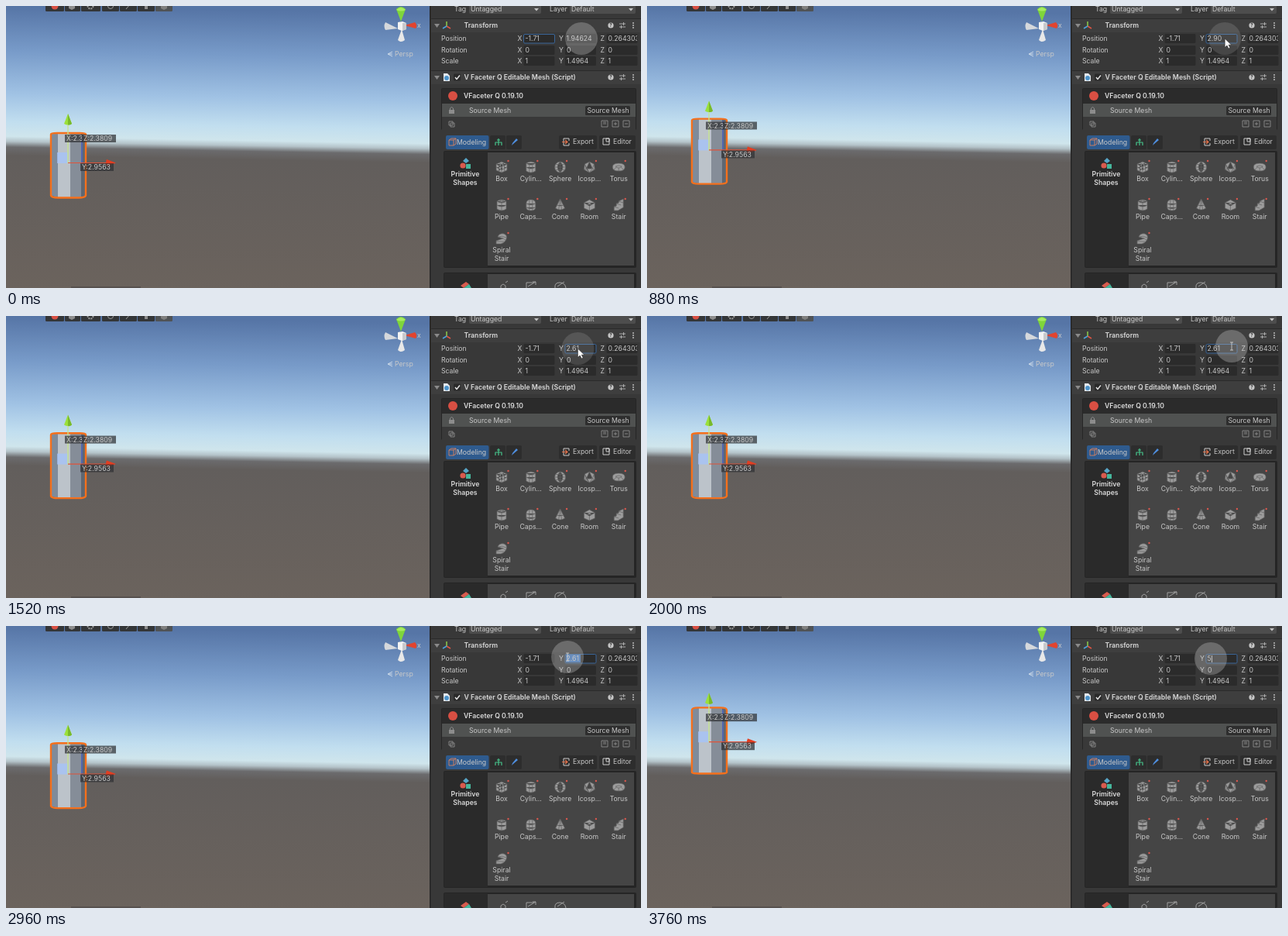
Animation of 820 by 364 pixels, one loop 3840 ms. Source, as an HTML page:

```html
<!DOCTYPE html>
<html lang="en">
<head>
<meta charset="utf-8">
<title>Mesh position editing</title>
<style>
html, body { margin: 0; width: 100%; height: 100%; overflow: hidden; background: #383838; }
svg { display: block; width: 820px; height: 364px; }
text { font: 8.7px Inter, sans-serif; fill: #c8c8c8; white-space: pre; }
.b { font-weight: 600; fill: #dadada; }
.m { text-anchor: middle; }
</style>
</head>
<body>
<svg id="stage" viewBox="0 0 820 364">
  <defs>
    <linearGradient id="sky" gradientUnits="userSpaceOnUse" x1="0" y1="0" x2="0" y2="364">
      <stop offset="0" stop-color="#5675a6"/>
      <stop offset=".16" stop-color="#789bc9"/>
      <stop offset=".31" stop-color="#a0c2e4"/>
      <stop offset=".41" stop-color="#c1deef"/>
      <stop offset=".462" stop-color="#cfe5ec"/>
      <stop offset=".48" stop-color="#b4c3c9"/>
      <stop offset=".5" stop-color="#6b6b6d"/>
      <stop offset=".53" stop-color="#625e5c"/>
      <stop offset="1" stop-color="#6b635d"/>
    </linearGradient>
    <clipPath id="zClip"><rect x="775" y="36" width="40" height="13"/></clipPath>
    <clipPath id="view"><rect width="547" height="364"/></clipPath>
  </defs>
</svg>
<script>
const stage = document.getElementById('stage');
const LOOP = 3840, STEP = 80;

function add(tag, attrs, parent = stage) {
  const el = document.createElementNS('http://www.w3.org/2000/svg', tag);
  for (const k in attrs) el.setAttribute(k, attrs[k]);
  parent.appendChild(el);
  return el;
}
const rect = (x, y, width, height, fill, parent, rx = 0) =>
  add('rect', { x, y, width, height, fill, rx }, parent);
const path = (d, fill, parent, stroke = 'none', w = 1) =>
  add('path', { d, fill, stroke, 'stroke-width': w, 'stroke-linejoin': 'round' }, parent);
const circle = (cx, cy, r, fill, parent) => add('circle', { cx, cy, r, fill }, parent);
const group = (x, y, parent) => add('g', { transform: `translate(${x} ${y})` }, parent);
// y is the middle of the line
function label(str, x, y, cls = '', parent) {
  const el = add('text', { x, y: y + 3.2, class: cls }, parent);
  el.textContent = str;
  return el;
}

// Scene backdrop
const scene = add('g', { 'clip-path': 'url(#view)' });
add('rect', { x: 0, y: -20, width: 548, height: 400, fill: 'url(#sky)', transform: 'skewY(1)' }, scene);
rect(84, 362, 90, 2, '#57514e', scene);

// Scene toolbar
for (const [x, w, fill] of [[51, 24, '#343638'], [76, 20, '#343638'], [97, 25, '#343638'],
  [124, 22, '#343638'], [147, 22, '#343638'], [170, 22, '#343638'], [193, 22, '#505356']])
  rect(x, -4, w, 11, fill, scene, 1.5);
circle(63, 0, 4.5, '#d84f43', scene);
path('M81 0v3l4 2 4-2v-3z', '#8d8d8d', scene);
add('circle', { cx: 109, cy: 0, r: 3.5, fill: 'none', stroke: '#999', 'stroke-width': 2, 'stroke-dasharray': '2 1' }, scene);
add('circle', { cx: 135, cy: 0, r: 3.5, fill: 'none', stroke: '#999' }, scene);
path('M155 4l5-6', 'none', scene, '#999');
path('M179 0h4v4h-4z', '#8d8d8d', scene);
path('M200 0v3l4 2 4-2v-3z', '#808080', scene);

// Orientation gizmo
const axes = group(511, 26, scene);
path('M-5 3L-21 -5Q-24 0 -21 5z', '#d5d8dc', axes);
path('M0 4l-5 14q4 4 9 0z', '#e8e8e8', axes);
path('M4 -1l13 -4q4 4 1 8z', '#e1442f', axes);
path('M-1 -6l-6 -16q6 -6 12 0z', '#7fd53a', axes);
path('M-7 -21q6 -6 12 0q-6 3 -12 0z', '#a5ea60', axes);
path('M-5 -5L1 -6L6 -4V4L0 6L-5 4z', '#f3f3f3', axes);
path('M1 -4L6 -4V4L1 6z', '#c8cacd', axes);
label('x', 20, -1, '', axes);
path('M499 59l-6 3 6 3M499 62h-5', 'none', scene, '#dfe7ef', .8);
label('Persp', 502, 62, '', scene);

// Cylinder and move handle, centred on the handle origin
const body = add('g', {}, scene);
const faces = [['#7f8b9a', 59, 67], ['#bcc3ca', 67, 83], ['#858d98', 83, 97], ['#5f6772', 97, 103]]
  .map(([fill, a, b]) => ({ a, b, el: path('', fill, body) }));
const outline = path('', 'none', body, '#f5701c', 2.4);
const blueAxis = path('', 'none', body, '#4867d8', 1.2);
add('rect', { x: 66, y: -14, width: 14, height: 14, fill: '#a4c3fb', opacity: .75 }, body);
path('M80 0V-51', 'none', body, '#c8e88a', 1.3);
path('M75 -51L80 -64L85 -51Q80 -48 75 -51z', '#9be03b', body);
path('M80 -64L85 -51Q83 -49 80 -49.5z', '#78b92c', body);
path('M80 -.5H132', 'none', body, '#e0533a', 1.2);
path('M130 -5L142 -.5L130 4Q128 -.5 130 -5z', '#e23e22', body);
function tag(str, x, y, w) {
  add('rect', { x, y: y - 5, width: w, height: 10, fill: '#303134', opacity: .72 }, body);
  label(str, x + 2, y, '', body);
}
tag('X:2.3', 76, -32, 23);
tag('Z:2.3809', 98, -32, 44);
tag('Y:2.9563', 96, 5, 43);

function placeBody(cy) {
  const rise = 203 - cy, top = -39 - rise * .11, low = 44.5 - rise * .08;
  const dip = 3 - rise * .03, lift = .5 + rise * .03;
  body.setAttribute('transform', `translate(0 ${cy})`);
  const edge = x => Math.min(1, (23 - Math.abs(x - 81)) / 9);
  const upper = x => top + lift * (1 - edge(x)), lower = x => low - dip * (1 - edge(x));
  for (const { a, b, el } of faces)
    el.setAttribute('d', `M${a} ${upper(a)}L${b} ${upper(b)}V${lower(b)}L${a} ${lower(a)}z`);
  outline.setAttribute('d', `M58 ${top + lift + 1}Q58 ${top} 66 ${top}H95Q103 ${top} 103 ${top + lift + 1}
    V${low - dip}Q102 ${low} 94 ${low}H67Q59 ${low} 58 ${low - dip}z`);
  blueAxis.setAttribute('d', `M98 ${top + 3}V-1`);
}

// Inspector
rect(547, 0, 273, 364, '#383838');
rect(547, 0, 1.5, 364, '#252525');
label('Tag', 579, 4);
label('Layer', 702, 4);
for (const [x, w, str] of [[598, 93, 'Untagged'], [728, 85, 'Default']]) {
  rect(x, -4, w, 14, '#4d4d4d', stage, 2);
  label(str, x + 2, 4);
  path(`M${x + w - 9} 3h6l-3 3.5z`, '#c4c4c4');
}

function header(y, str) {
  rect(549, y - 9, 271, 18, '#3e3e3e');
  rect(549, y - 9, 271, 1, '#2a2a2a');
  path(`M553 ${y - 2}h7l-3.5 5z`, '#8a8a8a');
  label(str, 591.5, y, 'b');
  circle(781, y, 3.6, '#c8c8c8');
  add('text', { x: 781, y: y + 2.3, class: 'm', style: 'font-size:6px;font-weight:700;fill:#333' }).textContent = '?';
  path(`M792 ${y - 2}h8M792 ${y + 2}h8M797.5 ${y - 4}v4M794.5 ${y}v4`, 'none', stage, '#b8b8b8', .9);
  for (const d of [-3, 0, 3]) circle(810, y + d, .9, '#c8c8c8');
}
header(25, 'Transform');
path('M569 26V20', 'none', stage, '#8dcf4a', 1.5);
path('M569 26l5 3', 'none', stage, '#e25543', 1.5);
path('M569 26l-5 3', 'none', stage, '#4aa3dd', 1.5);

const fields = [['Position', 42, '-1.71', '', '0.264303'],
  ['Rotation', 57, '0', '0', '0'], ['Scale', 71, '1', '1.4964', '1']];
for (const [name, y, ...values] of fields) {
  label(name, 562, y);
  values.forEach((value, i) => {
    const x = 668.5 + i * 53.5;
    label('XYZ'[i], x - 8, y);
    rect(x, y - 6, 40, 12, '#2b2b2b', stage, 1.5);
    const box = add('g', i == 2 && y == 42 ? { 'clip-path': 'url(#zClip)' } : {});
    label(value, x + 2, y, '', box);
  });
}
const focus = add('rect', { y: 36.5, width: 40, height: 11.5, rx: 1.5, fill: 'none', stroke: '#3c6ca6', 'stroke-width': .9 });
const select = rect(723, 37, 19, 10, '#3b72b8');
const yText = label('', 723.5, 42);
const caret = rect(729, 38, .8, 9, '#ddd');

header(92, 'V Faceter Q Editable Mesh (Script)');
path('M565 87h5l3 3v7h-8z', '#e4e9ee');
circle(569, 93, 3, '#4d93c9');
rect(578, 87.5, 9, 9, '#2a2a2a', stage, 1.5);
path('M580 92l2 2.5 4-5', 'none', stage, '#e4e4e4', 1.4);

// Mesh summary
rect(562, 106, 252, 54, '#252525', stage, 2);
rect(563, 107, 250, 19, '#2b2b2b');
circle(577, 116, 6, '#d84f43');
label('VFaceter Q 0.19.10', 591, 116, 'b');
rect(563, 126, 250, 17, '#505251');
rect(572, 134, 7, 5, '#8c8c8c');
path('M573.5 134v-2q2-3 4 0v2', 'none', stage, '#8c8c8c');
label('Source Mesh', 598, 135);
rect(748, 129, 58, 12, '#2e2e2e', stage, 1.5);
label('Source Mesh', 750.5, 135);
rect(563, 143, 250, 17, '#393939');
path('M572 149h5v5h-5zM574 151h5v5h-5z', 'none', stage, '#959595', .8);
path('M769 148h8v8h-8zM771 150h4M771 152h4M783 148h8v8h-8zM785 152h4M787 150v4M797 148h8v8h-8zM799 152h4', 'none', stage, '#959595', .8);

// Tabs
function tab(x, w, fill) { rect(x, 167, w, 18, fill, stage, 2); }
tab(568, 55.5, '#2f5b8e');
for (const [x, w] of [[625, 20], [646, 20], [714, 49], [766, 47]]) tab(x, w, '#2d2d2d');
path('M572 173l3-2h6v7l-3 2h-6zM572 173h6v7M578 173l3-2', 'none', stage, '#d9835f', .9);
label('Modeling', 582, 176);
path('M636 180v-9M632 180v-4h8v4M634 173h4', 'none', stage, '#47c28a', 1.2);
path('M653 180l1-3 5-6 2 2-6 5z', '#4f8fe0');
path('M720 171h7v3M727 177v3h-7v-9', 'none', stage, '#ccc');
path('M718 175.5h7M722 173l3 2.5-3 2.5', 'none', stage, '#e0704a', 1.2);
label('Export', 732, 175);
path('M771 171h8v8h-8zM775 171h4v4h-4z', 'none', stage, '#ccc');
label('Editor', 784, 175);

// Shape palette
rect(565, 187, 249, 151, '#252525', stage, 2);
rect(566, 188, 56, 149, '#2a2a2a');
rect(622, 189, 189, 146, '#454545');
path('M590 200l4-4 4 4-4 3z', '#57a5c7');
circle(590, 206, 3.6, '#d95b4e');
path('M594 204h6v6h-6z', '#46b59b');
label('Primitive', 593, 217, 'b m');
label('Shapes', 593, 228, 'b m');

const ICONS = {
  Box: 'M0-7L7-4V4L0 7L-7 4V-4zM-7-4L0 0L7-4M0 0V7M-3.5-5.5L3.5-2V5.5M3.5-5.5L-3.5-2V5.5M-7 0L0 3.5L7 0',
  'Cylin...': 'M-6-5Q0-9 6-5V5Q0 9-6 5zM-6-5Q0-1 6-5M-2-3V7M2-3V7M-6 0Q0 4 6 0',
  Sphere: 'M-7 0A7 7 0 0 1 7 0A7 7 0 0 1-7 0zM-7 0H7M-6-3.5H6M-6 3.5H6M0-7V7M0-7Q-7 0 0 7M0 7Q7 0 0-7',
  'Icosp...': 'M0-7L6-4L7 3L0 7L-7 3L-6-4zM0-7L-4 2H4L0-7M-6-4L-4 2L0 7M6-4L4 2L0 7M-7 3L-4 2M7 3L4 2',
  Torus: 'M-8 0Q-8-5 0-5T8 0Q8 5 0 5T-8 0zM-4-1Q0-3 4-1Q0 3-4-1zM-6 3L-3 0M6 3L3 0M0 5V1',
  Pipe: 'M-6-5Q0-9 6-5V5Q0 9-6 5zM-6-5Q0-1 6-5M-3-5Q0-7 3-5Q0-3-3-5M-6 0Q0 4 6 0M0-3V7',
  'Caps...': 'M-6-2Q-6-7 0-7T6-2V3Q6 7 0 7T-6 3zM-6-2Q0 1 6-2M-6 3Q0 6 6 3M-2-6V7M2-6V7',
  Cone: 'M0-8L6 4Q0 8-6 4zM0-8L-2 6M0-8L2 6M-4 0Q0 2 4 0',
  Room: 'M0-7L7-3V4L0 7L-7 4V-3zM-7-3L0 1L7-3M0 1V7M-3-1L0-3L3-1',
  Stair: 'M-6 7V2L-3 1V-2L0-3V-5L6-8V3L-1 7zM-6 2L0 4M-3-2L3 0M0-5L6-3',
  Spiral: 'M-7 6V2L2-1L-5-3Q-3-8 3-7Q8-5 6 0Q4 5-1 6zM-7 3H3M-4-3Q0-5 6-2M2-1L6 2'
};
Object.entries(ICONS).forEach(([name, d], i) => {
  const x = 640 + i % 5 * 37.8, row = Math.floor(i / 5), y = [208, 257, 301][row];
  path(d, '#9c9c9c', group(x, y), '#606060', .7);
  circle(x + 8.5, y - 8, 1.2, '#d8574d');
  label(name, x, [223, 272, 315][row], 'm');
});
label('Stair', 640, 326, 'm');

// Next palette, cut by the stage edge
rect(565, 344, 249, 20, '#252525', stage, 2);
rect(566, 345, 56, 19, '#2a2a2a');
rect(622, 346, 189, 18, '#454545');
path('M587 361l7-5 4 3-7 5z', '#d95b4e');
path('M591 364l7-5 3 5z', '#46b59b');
path('M639 364v-3l3-2 3 2v3M645 357l3-2M672 364v-7h10M674 362l10-6M680 356h4v4M709 364q-1-7 6-7t8 7M712 362l9-6', 'none', stage, '#a8a8a8', .9);

// Pointer
const ring = add('circle', { cx: 746, cy: 42, r: 9, fill: 'none', stroke: '#b7754a', 'stroke-width': 1.1, opacity: .7 });
const pointer = add('g', {});
const halo = circle(0, 0, 21, '#c9c9c9', pointer);
const arrow = path('M0 0V11.5L2.8 9L4.8 13L6.8 12L4.9 8.2H8.5z', '#fff', pointer, '#222', .6);
const beam = path('M-2-5H2M0-5V5M-2 5H2', 'none', pointer, '#ccc', .9);

// time, x, y
const TRACK = [[0, 743, 42], [80, 743, 42], [400, 721, 42], [560, 721, 42], [1040, 755, 42],
  [1120, 755, 42], [1440, 738.4, 42], [1600, 738.4, 42], [1840, 755, 39], [2000, 755, 39],
  [2240, 746, 42], [2400, 746, 42], [2560, 715, 40], [2720, 715, 40], [3040, 727, 40],
  [3360, 727, 40], [3520, 728, 42], [LOOP, 728, 42]];

function track(t) {
  const i = TRACK.findIndex(k => k[0] > t);
  const [t0, x0, y0] = TRACK[i - 1], [t1, x1, y1] = TRACK[i];
  const u = (t - t0) / (t1 - t0), e = u * u * (3 - 2 * u);
  return [x0 + (x1 - x0) * e, y0 + (y1 - y0) * e];
}
const show = (el, on) => el.setAttribute('visibility', on ? 'visible' : 'hidden');

function render(t) {
  const [x, y] = track(t);
  const dragging = t >= 560 && t < 1600, typed = t >= 3120;
  // Dragging the Y label scrubs the value by .038 per pixel
  let value = 1.94624;
  if (dragging) value += (x - 721) * .038;
  if (t >= 1600) value = 2.61;
  if (t >= 3600) value = 5;
  placeBody(203 - (value - 1.94624) * 17.3);

  yText.textContent = typed ? '5' : t <= 560 ? '1.94624' : value.toFixed(2);
  focus.setAttribute('x', t < 560 ? 668.5 : 722);
  show(select, t >= 2400 && !typed);
  show(caret, typed);
  show(ring, t >= 2400 && t < 2640);

  pointer.setAttribute('transform', `translate(${x} ${y})`);
  halo.setAttribute('opacity', dragging ? .17 : .32);
  const overLabel = t >= 320 && t < 1680 || t >= 2480 && t < 2800;
  show(arrow, overLabel);
  show(beam, !overLabel && t >= 160 && t < 3520);
}

function tick() {
  render(Math.floor(performance.now() % LOOP / STEP) * STEP);
  requestAnimationFrame(tick);
}
tick();
</script>
</body>
</html>
```
